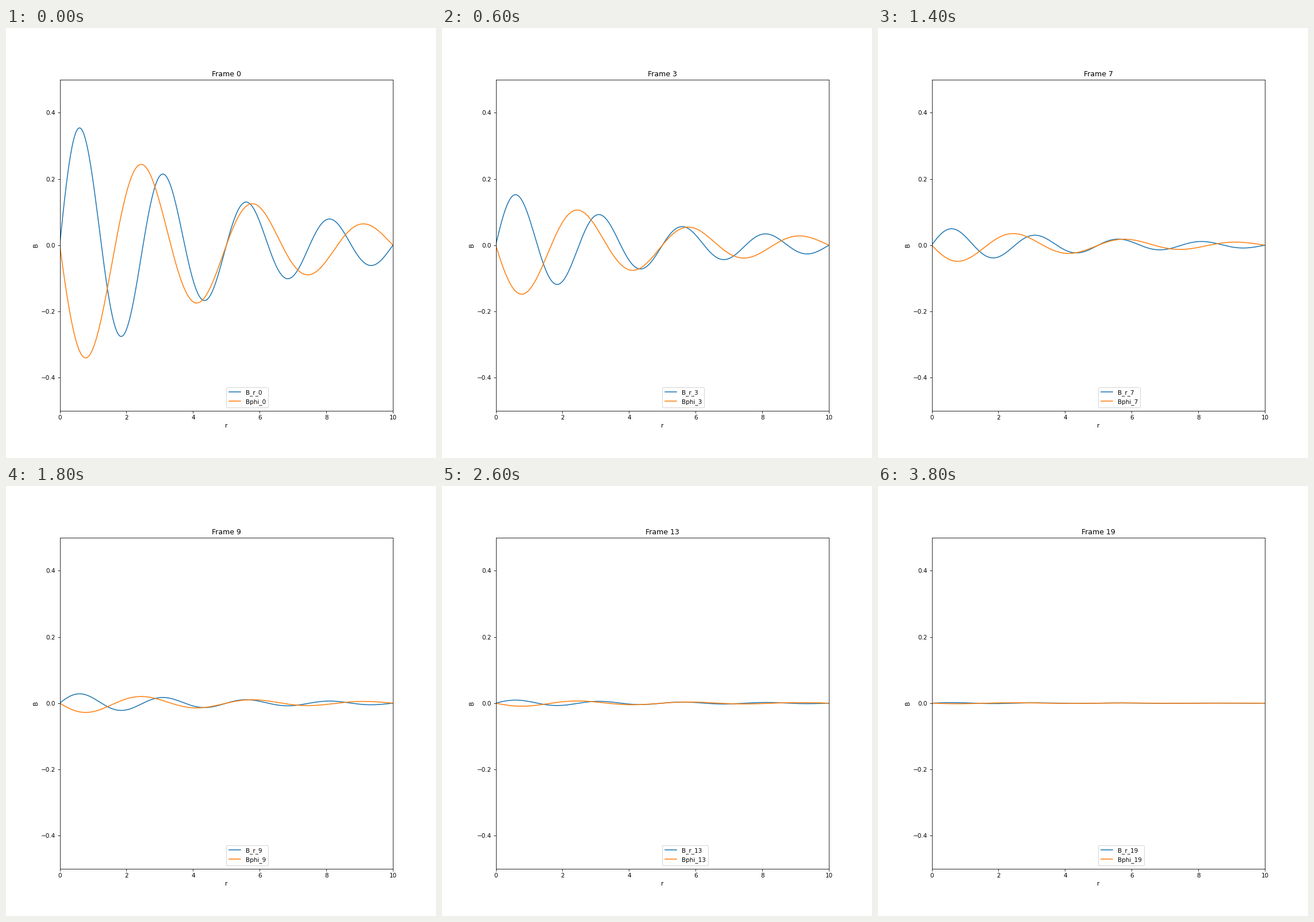
Animation, 748 px wide and 748 px high, one loop 4 s. Source, as a matplotlib script:

```python
import matplotlib.pyplot as plt
import numpy as np
from matplotlib.animation import FuncAnimation

FRAMES, INTERVAL = 20, 200
AMPLITUDE, DAMPING = 0.4, 0.2

r = np.linspace(0, 10, 1001)
envelope = AMPLITUDE * np.exp(-DAMPING * r)
# label, radial profile, decay rate per step
FIELDS = [
    ("B_r", envelope * np.sin(0.8 * np.pi * r), 0.281),
    ("Bphi", -envelope * np.sin(0.6 * np.pi * r), 0.2775),
]

fig, ax = plt.subplots(figsize=(10, 10), dpi=74.8)
fig.subplots_adjust(left=0.125, right=0.9, bottom=0.11, top=0.88)
ax.set(xlim=(0, 10), ylim=(-0.5, 0.5), xlabel="r", ylabel="B")
ax.set_yticks([-0.4, -0.2, 0, 0.2, 0.4])
lines = [ax.plot(r, profile)[0] for _, profile, _ in FIELDS]


def update(step):
    for line, (name, profile, rate) in zip(lines, FIELDS):
        line.set_ydata(profile * np.exp(-rate * step))
        line.set_label(f"{name}_{step}")
    ax.set_title(f"Frame {step}")
    ax.legend(loc=(0.5, 0.01))
    return lines


anim = FuncAnimation(fig, update, frames=FRAMES, init_func=lambda: update(0),
                     interval=INTERVAL, repeat=True, repeat_delay=0)
plt.show()
```
